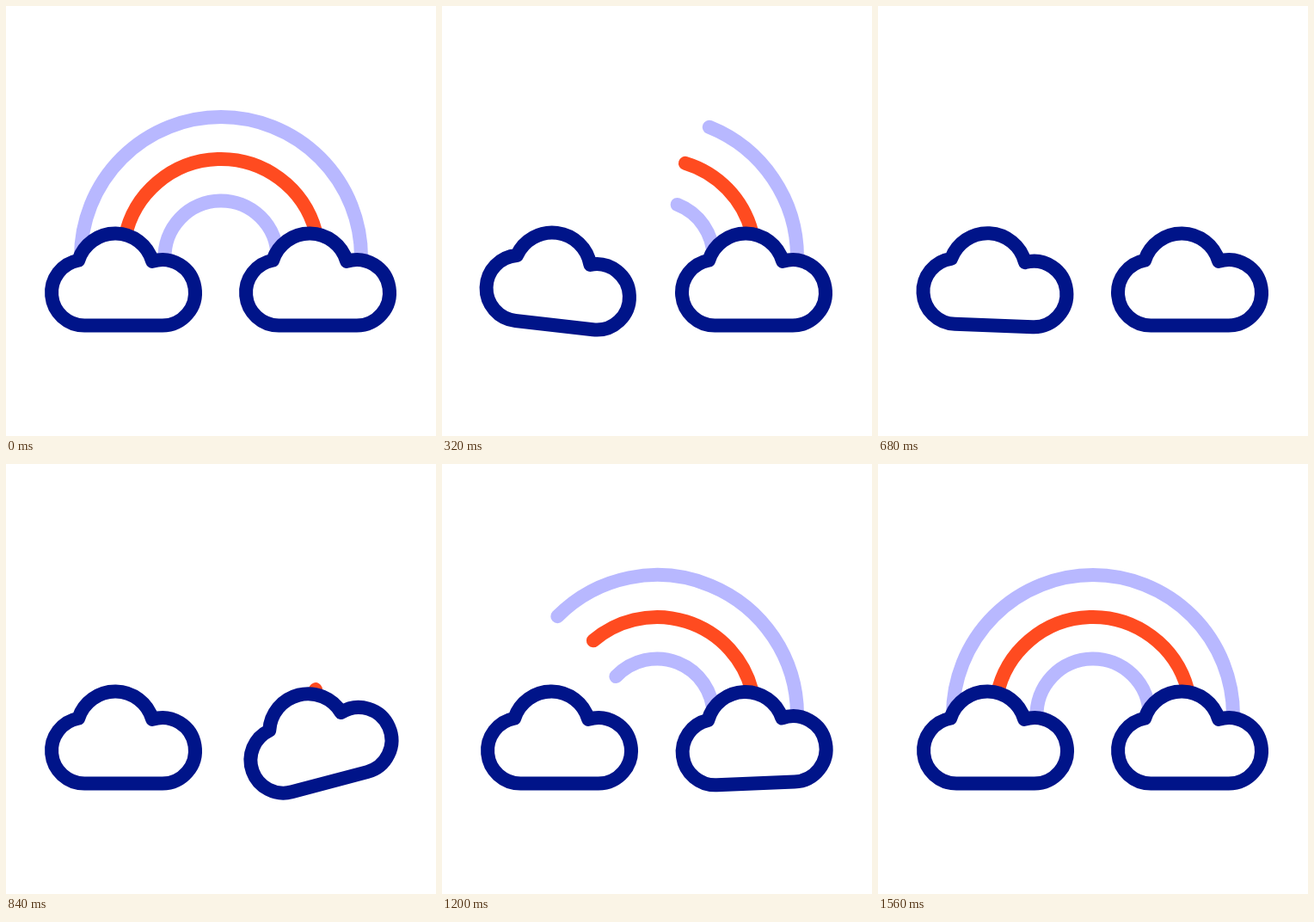
These frames come from a looping animation (500x500 px, 2 s). An HTML page:

```html
<!DOCTYPE html>
<html lang="en">
<head>
<meta charset="utf-8">
<title>Rainbow between clouds</title>
<style>
  html, body { margin: 0; width: 100%; height: 100%; overflow: hidden; background: #fff; }
  svg { display: block; width: 100vw; height: 100vh; }
  path { fill: none; stroke-width: 16; stroke-linecap: round; stroke-linejoin: round; }
  .pale { stroke: #b8b8ff; }
  .warm { stroke: #ff4b20; }
  .cloud { fill: #fff; stroke: #001489; }
</style>
</head>
<body>
<svg viewBox="0 0 500 500">
  <defs>
    <path id="cloud" class="cloud" d="M91.2 371.5A38.2 38.2 0 0 1 84.2 295.75A45 45 0 0 1 170.2 296.9A38.2 38.2 0 1 1 181.8 371.5Z"/>
  </defs>
  <path class="pale"/>
  <path class="warm"/>
  <path class="pale"/>
  <g id="left"><use href="#cloud"/></g>
  <g transform="translate(226 0)"><g id="right"><use href="#cloud"/></g></g>
</svg>
<script>
const LOOP = 2000, STEP = 40;
const CX = 250, CY = 292;
const DRAW = 550, GROW_AT = 829, RIGHT_AT = 760;

// radius, then start and end angle in degrees from straight up
const bands = [[163, -90, 90], [114, -78.8, 75], [65.5, -92, 90]];

// damped rocking: time in ms, angle in degrees
const rock = [[0, 0], [120, -20], [345, 7.5], [480, -5], [640, 2.5], [800, 0]];

const arcs = document.querySelectorAll('svg > path');
const left = document.getElementById('left');
const right = document.getElementById('right');

const ease = x => {
  const s = Math.min(1, Math.max(0, x));
  return s * s * (3 - 2 * s);
};
const mix = (a, b, k) => a + (b - a) * k;

function rockAngle(t) {
  if (t <= 0) return 0;
  for (let i = 1; i < rock.length; i++) {
    const [t0, a0] = rock[i - 1], [t1, a1] = rock[i];
    if (t < t1) return mix(a0, a1, ease((t - t0) / (t1 - t0)));
  }
  return 0;
}

function point(r, deg) {
  const a = deg * Math.PI / 180;
  return (CX + r * Math.sin(a)).toFixed(2) + ' ' + (CY - r * Math.cos(a)).toFixed(2);
}

function arcPath([r, from, to], hidden) {
  if (hidden >= 1) return '';
  const start = mix(from, to, hidden);
  const large = to - start > 180 ? 1 : 0;
  return `M${point(r, start)}A${r} ${r} 0 ${large} 1 ${point(r, to)}`;
}

function render(t) {
  const hidden = t < GROW_AT ? ease(t / DRAW) : 1 - ease((t - GROW_AT) / DRAW);
  arcs.forEach((arc, i) => arc.setAttribute('d', arcPath(bands[i], hidden)));
  left.setAttribute('transform', `rotate(${rockAngle(t)} 136.5 318)`);
  right.setAttribute('transform', `rotate(${rockAngle(t - RIGHT_AT)} 136.5 318)`);
}

const origin = performance.now();
function tick() {
  const t = (performance.now() - origin) % LOOP;
  render(Math.floor(t / STEP) * STEP);
  requestAnimationFrame(tick);
}
tick();
</script>
</body>
</html>
```
